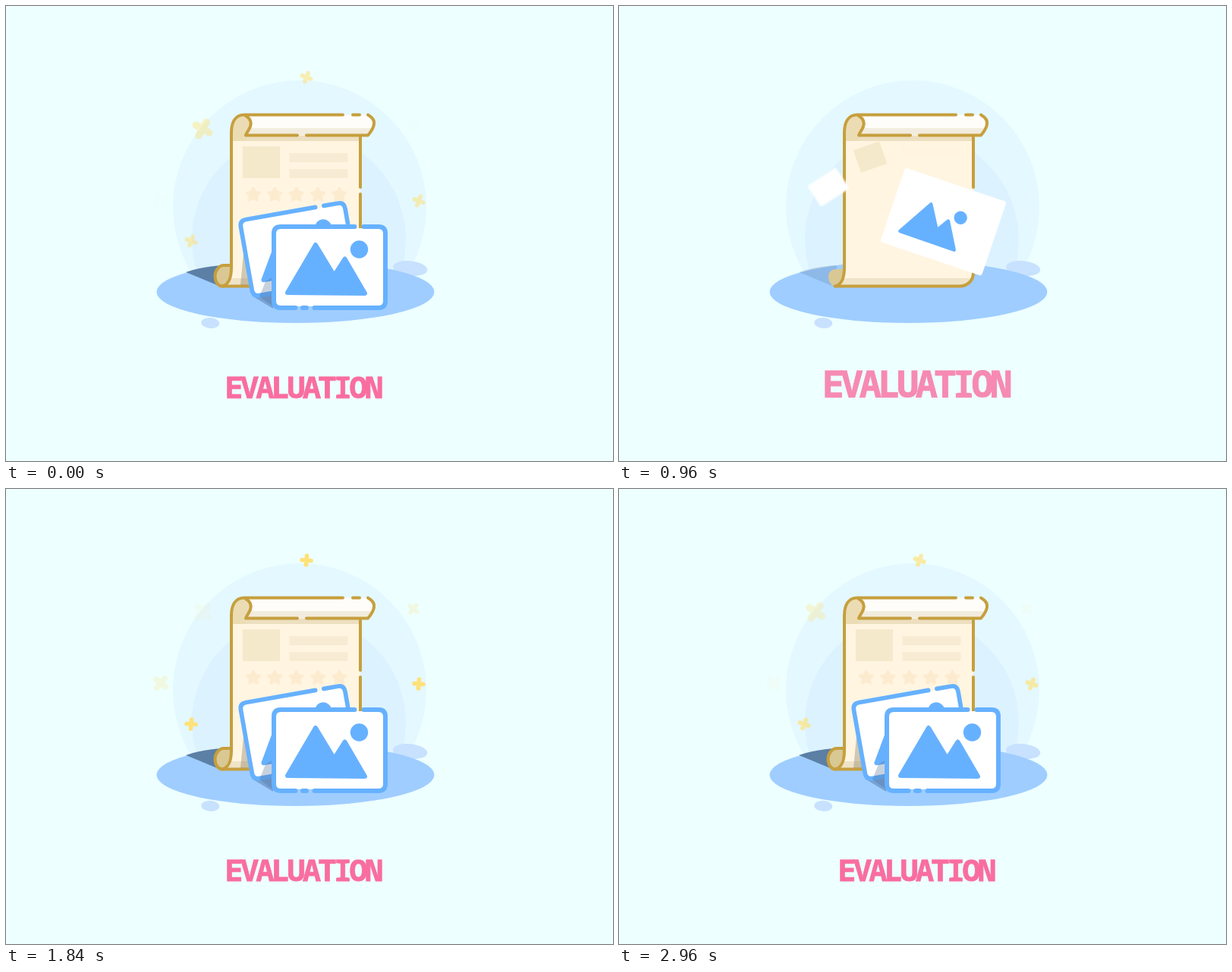
Animation of 800x600 px, one loop 3 s. Source, as an HTML page:

```html
<!DOCTYPE html>
<html lang="en">
<head>
<meta charset="utf-8">
<title>Evaluation</title>
<style>
  html, body { margin: 0; width: 100%; height: 100%; overflow: hidden; background: #edffff; }
  svg { display: block; width: 100vw; height: 100vh; }
  .gold { fill: none; stroke: #c69f3d; stroke-width: 4; stroke-linecap: round; stroke-linejoin: round; }
  .frame { fill: none; stroke: #66b1ff; stroke-width: 6; stroke-linecap: round; }
  .spark { fill: none; stroke: #ffe073; stroke-width: 9.5; stroke-linecap: round; }
  text { font: 900 40px "Noto Sans Mono", "DejaVu Sans Mono", monospace; letter-spacing: -3.5px;
         fill: #f96d9f; stroke: #f96d9f; stroke-width: .8px; text-anchor: middle; }
</style>
</head>
<body>
<svg viewBox="0 0 800 600">
  <defs>
    <clipPath id="ground"><rect width="800" height="375"/></clipPath>
    <g id="picture" fill="#66b1ff" stroke="#66b1ff" stroke-width="6" stroke-linejoin="round">
      <path d="M-55.5 33.5L-18.5-29.5L6 11L20-11L46.5 34.5Z"/>
      <circle cx="39" cy="-23.5" r="11.7" stroke="none"/>
    </g>
  </defs>

  <g id="halo"><circle cx="387" cy="265" r="167" fill="#e4f8ff" clip-path="url(#ground)"/></g>
  <g id="glow"><circle cx="386" cy="308" r="141" fill="#dcf2ff" clip-path="url(#ground)"/></g>
  <g id="puddleR"><ellipse rx="22.7" ry="9.8" fill="#c7e1ff" transform="rotate(6)"/></g>
  <g id="puddleL"><ellipse rx="12" ry="7" fill="#c7e1ff" transform="rotate(4)"/></g>
  <g id="floorWrap"><ellipse id="floor" fill="#9fcdff" cx="381.5" cy="377"/></g>

  <path id="castShadow" fill="#5b7fa5" d="M237 351Q258 343.500 287 342V370H283Z"/>
  <g id="paperWrap"><path id="paper" fill="#fff5e1"/></g>
  <g id="shading">
    <path fill="#ecdfc0" d="M297 171H467V178H297Z"/>
    <path fill="#efe4c8" d="M294 359H466Q461 369.500 449 369.500H285Q291 367 294 359Z"/>
    <path fill="#d9c894" d="M297 347H287C280 347 276 351 276 356C276 364 280 369.500 285 369.500C292 368 297 360 297 347Z"/>
    <path fill="#ecdcb4" d="M297 178V165C297 152 303 143.500 314 143.500C324 148 325 155 321 161C318 165 316 168 316 171V178Z"/>
    <path fill="#fefdf9" d="M314 143.500H477C483 147 486 151 485 156C484 162 480 167 477 170.500H316C316 166 323 162 323 156C323 150 319 146 314 143.500Z"/>
    <path fill="#f1ecdd" d="M321 161H483L477 170.500H316Z"/>
  </g>
  <path id="curlFill" fill="#d9c894" d="M297 342H287C280 342 275.500 350 275.500 356V360H297Z"/>
  <g id="block"><rect x="-24.500" y="-21" width="49" height="42" fill="#f5e9cc"/></g>
  <rect id="line0" x="373.500" width="77" height="12" fill="#f7ecd3"/>
  <rect id="line1" x="373.500" width="77" height="12" fill="#f7ecd3"/>
  <g id="stars" fill="#fdebcf" stroke="#fdebcf" stroke-width="3" stroke-linejoin="round"></g>
  <g id="outline" class="gold">
    <path d="M285 369.500C292 368 297 360 297 345V167C297 152 303 143.500 314 143.500H444"/>
    <path d="M316 145C322 148 324 154 322 159S317 167 316 170.500H384"/>
    <path d="M457 143.500H466"/>
    <path d="M477 143.500C483 147 486 151 485 156C484 162 480 167 477 170.500H396"/>
    <path d="M467 173V239"/>
    <path d="M285 369.500H449C459 369.500 467 362 467 352V248"/>
  </g>
  <path id="curl" class="gold" d="M285 369.500C280 369.500 275.500 364 275.500 356C275.500 350 280 342 287 342H296"/>

  <g id="contact">
    <path fill="#7f7458" opacity=".35" d="M314 316L309 368H326Z"/>
    <path fill="#6b93c6" opacity=".75" d="M324 382L352 376V399Z"/>
  </g>
  <g id="backWrap"><g id="back"></g></g>
  <path id="cardShade" fill="#4a6a94" opacity=".3" d="M342 363L352 357V396L334 383Z"/>
  <g id="frontWrap"><g id="front"></g></g>

  <g id="sparks"></g>
  <g id="titleWrap"><g id="title"><text x="391" y="516.500">EVALUATION</text></g></g>
</svg>
<script>
const LOOP = 3000, STEP = 40;
const NS = "http://www.w3.org/2000/svg";
const $ = id => document.getElementById(id);
const clamp = x => Math.min(1, Math.max(0, x));
const mix = (a, b, k) => a + (b - a) * k;
const ease = (t, from, to) => { const x = clamp((t - from) / (to - from)); return x * x * (3 - 2 * x); };

// grows past full size by `over`, then settles at 1
const pop = (t, start, half, over) =>
  (1 + over) * ease(t, start, start + half) - over * ease(t, start + half, start + 2 * half);

function set(el, attrs) {
  const node = typeof el === "string" ? $(el) : el;
  for (const name in attrs) node.setAttribute(name, attrs[name]);
}
const place = (id, x, y, angle, scale) =>
  set(id, { transform: `translate(${x} ${y}) rotate(${angle}) scale(${scale})` });
const scaleAt = (id, x, y, s) =>
  set(id, { transform: `translate(${x} ${y}) scale(${s}) translate(${-x} ${-y})` });

// directional blur, sized by how far an edge travels while the shutter is open
const blurred = ["paper", "floor", "back", "front", "title"];
for (const id of blurred) {
  const filter = document.createElementNS(NS, "filter");
  set(filter, { id: id + "Blur", filterUnits: "userSpaceOnUse", x: 0, y: 0, width: 800, height: 600,
                "color-interpolation-filters": "sRGB" });
  filter.appendChild(document.createElementNS(NS, "feGaussianBlur"));
  document.querySelector("defs").appendChild(filter);
}
function blur(id, t, speed, wx, wy) {
  const travel = Math.abs(speed(t + 10) - speed(t - 10)) * .27;
  const sx = travel * wx, sy = travel * wy, wrap = $(id + "Wrap");
  if (Math.max(sx, sy) < .3) return wrap.removeAttribute("filter");
  set($(id + "Blur").firstChild, { stdDeviation: `${sx} ${sy}` });
  set(wrap, { filter: `url(#${id}Blur)` });
}

function trim(path, k) {
  set(path, { pathLength: 1, "stroke-dasharray": k >= 1 ? "none" : `${k} 2`, visibility: k > 0 ? "visible" : "hidden" });
}

for (const id of ["back", "front"]) {
  $(id).innerHTML = `<rect x="-70.500" y="-51.500" width="141" height="103" rx="3" fill="#fff"/>
    <g class="pic"><use href="#picture"/></g>
    <path class="frame" d="M-45 53.500H-64.500Q-73.500 53.500-73.500 44.500V-44.500Q-73.500-53.500-64.500-53.500H33"/>
    <path class="frame" d="M45-53.500H64.500Q73.500-53.500 73.500-44.500V44.500Q73.500 53.500 64.500 53.500H-20"/>
    <path class="frame" d="M-35.500 53.500h5"/>`;
}
function card(id, x, y, angle, scale, pic, drawn) {
  place(id, x, y, angle, scale);
  set(id, { visibility: scale > .005 ? "visible" : "hidden" });
  const node = $(id);
  set(node.querySelector(".pic"), { transform: `translate(-35 20) scale(${pic}) translate(35 -20)` });
  node.querySelectorAll(".frame").forEach(path => trim(path, drawn));
}

const starPoints = Array.from({ length: 10 }, (_, i) => {
  const r = i % 2 ? 4.6 : 9, a = i * Math.PI / 5;
  return `${(r * Math.sin(a)).toFixed(2)},${(-r * Math.cos(a)).toFixed(2)}`;
}).join(" ");
$("stars").innerHTML = [-2, -1, 0, 1, 2].map(i =>
  `<polygon points="${starPoints}" transform="translate(${382.7 + i * 28.4} 249)"/>`).join("");

const sparks = [
  { x: 259, y: 162, size: 30, peak: 1480, period: 880, start: 1040 },
  { x: 204, y: 256, size: 24, peak: 1480, period: 1040, start: 960 },
  { x: 537, y: 158, size: 18, peak: 1480, period: 1040, start: 960 },
  { x: 396, y: 94, size: 18, peak: 1774, period: 990, start: 1360, turn: true },
  { x: 544, y: 257, size: 18, peak: 1774, period: 990, start: 1360, turn: true },
  { x: 244, y: 310, size: 18, peak: 1774, period: 990, start: 1360, turn: true }
];
for (const s of sparks) {
  s.node = document.createElementNS(NS, "path");
  set(s.node, { class: "spark", d: "M-10 0H10M0-10V10" });
  $("sparks").appendChild(s.node);
}

const floorSize = t => pop(t, 320, 180, .28);
const paperSize = t => ease(t, 540, 740);
const titleSize = t => pop(t, 780, 180, .2);
const slide = t => ease(t, 960, 1280);
const backSize = t => ease(t, 840, 1150);

function drawGround(t) {
  const f = floorSize(t);
  set("floor", { rx: 183 * f, ry: 41 * f });
  blur("floor", t, t => 183 * floorSize(t), 1, .2);
  scaleAt("halo", 387, 375, pop(t, 400, 180, .14));
  scaleAt("glow", 386, 375, pop(t, 360, 180, .1));
  place("puddleR", 532.7, 346, 0, pop(t, 400, 180, .3));
  place("puddleL", 269.3, 418, 0, pop(t, 400, 180, .54));
}

function drawScroll(t) {
  const k = ease(t, 740, 840), r = 18 * k, s = paperSize(t);
  set("paper", {
    d: `M297 ${143 + 17 * k}H467V${369.5 - r}Q467 369.500 ${467 - r} 369.500H${297 - 12 * k}Q297 367 297 345Z`,
    transform: `translate(0 256.500) scale(1 ${s}) translate(0 -256.500)`
  });
  blur("paper", t, t => 113 * paperSize(t), 0, 1);
  set("shading", { opacity: ease(t, 740, 860) });
  const drawn = ease(t, 740, 930);
  for (const path of $("outline").children) trim(path, drawn);
  trim($("curl"), ease(t, 960, 1180));
  set("curlFill", { opacity: ease(t, 960, 1080) });
  set("castShadow", { opacity: ease(t, 900, 1080) });

  const b = ease(t, 860, 1010);
  place("block", 336.5 - 21 * (1 - b), 206 - 27 * (1 - b), -75 * (1 - b), b);
  [194, 215].forEach((y, i) => {
    const e = ease(t, 930 + 40 * i, 1050 + 40 * i);
    set("line" + i, { y: y - 11 * (1 - e), opacity: e });
  });
  scaleAt("stars", 382.7, 249, pop(t, 960, 130, .26));
}

function drawCards(t) {
  const m = slide(t), b = backSize(t);
  card("front", mix(427.5, 426.5, m), mix(284.5, 344.5, m), 19 * (1 - ease(t, 940, 1200)),
       ease(t, 620, 860), ease(t, 860, 1010), ease(t, 980, 1180));
  blur("front", t, t => 60 * slide(t), 0, 1);
  card("back", mix(276, 385.6, m), mix(239, 320.9, m), mix(-45, -10, b),
       .95 * b, ease(t, 1060, 1230), ease(t, 1140, 1360));
  blur("back", t, t => 70 * backSize(t) + 60 * slide(t), .7, .5);
  const settled = ease(t, 1200, 1360);
  set("contact", { opacity: settled });
  set("cardShade", { opacity: .3 * settled });
}

function drawSparks(t) {
  for (const { x, y, size, peak, period, start, turn, node } of sparks) {
    const glow = t < start ? 0 : .5 + .5 * Math.cos((t - peak) / period * 2 * Math.PI);
    const angle = turn ? (t - 1480) / 1480 * 20 : 6 + 42 * (1 - glow);
    set(node, { opacity: glow, transform: `translate(${x} ${y}) rotate(${angle}) scale(${size / 30})` });
  }
}

function drawTitle(t) {
  scaleAt("title", 391.5, 517, titleSize(t));
  set("title", { opacity: clamp((t - 760) / 250) });
  blur("title", t, t => 102 * titleSize(t), 1, 0);
}

function render(now) {
  const step = Math.floor(now % LOOP / STEP) * STEP;
  const t = step === 0 ? LOOP : step; // the loop opens on the finished scene
  drawGround(t);
  drawScroll(t);
  drawCards(t);
  drawSparks(t);
  drawTitle(t);
}

let origin;
function tick(now) {
  origin ??= now;
  render(now - origin);
  requestAnimationFrame(tick);
}
render(0);
requestAnimationFrame(tick);
</script>
</body>
</html>
```
